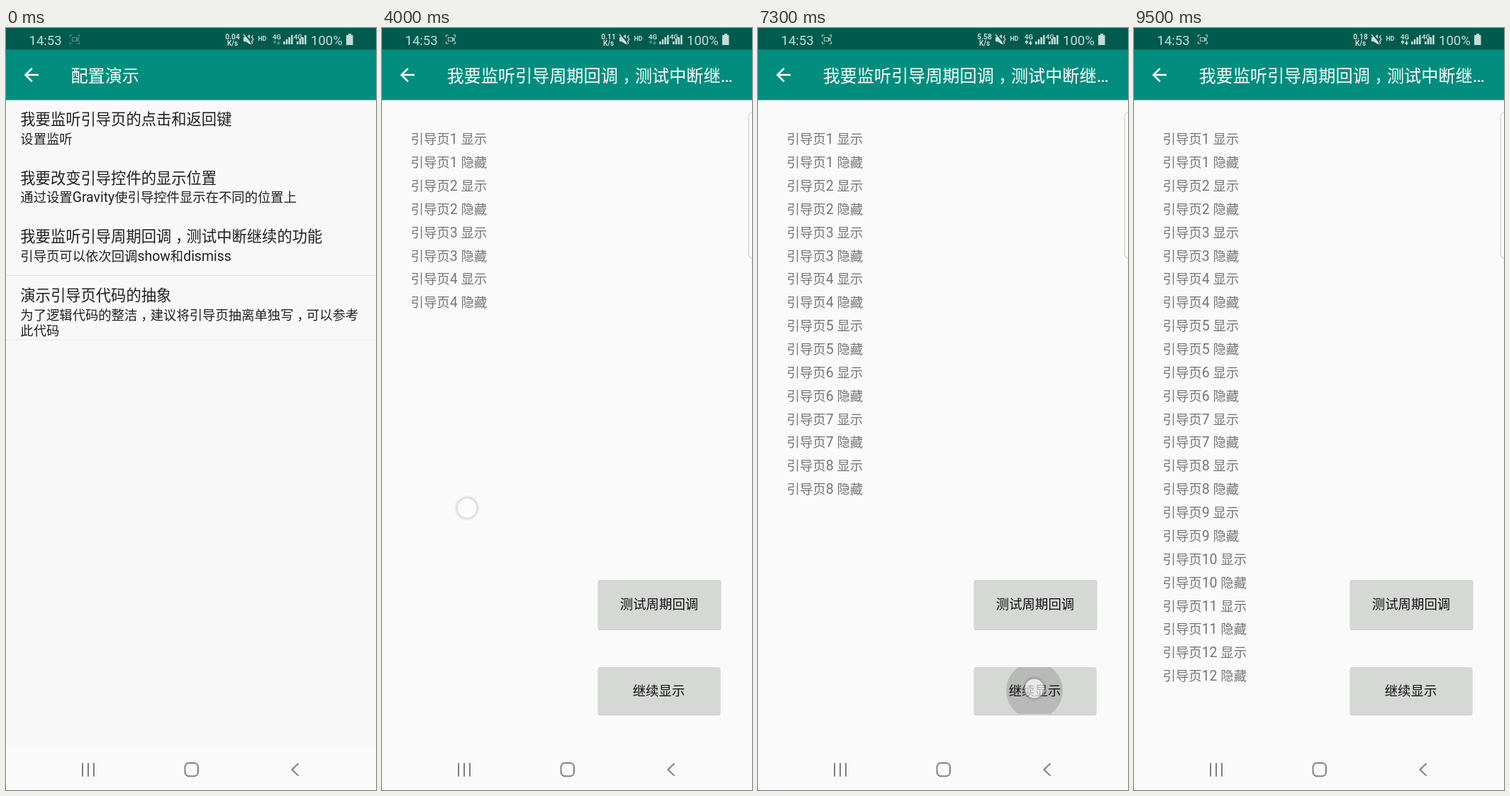
An HTML page that plays this animation: 522x1073 px, repeating every 9900 ms.

```html
<!DOCTYPE html>
<html lang="zh-CN">
<head>
<meta charset="utf-8">
<style>
html, body { margin: 0; width: 100%; height: 100%; overflow: hidden; background: #f9f9f9; }
svg { display: block; width: 522px; height: 1073px; }
text { font-family: Roboto, "Noto Sans CJK SC", "Noto Sans CJK", sans-serif; white-space: pre; }
</style>
</head>
<body>
<svg id="stage" viewBox="0 0 522 1073">
  <defs>
    <clipPath id="row"><rect y="266" width="522" height="82"/></clipPath>
    <clipPath id="test"><rect x="305" y="777" width="173" height="69" rx="2"/></clipPath>
    <clipPath id="next"><rect x="305" y="900" width="172" height="66" rx="2"/></clipPath>
    <filter id="soft" x="-50%" y="-50%" width="200%" height="200%"><feGaussianBlur stdDeviation="1"/></filter>
  </defs>
  <rect width="522" height="1073" fill="#f9f9f9"/>
  <g id="list">
    <rect y="30" width="522" height="71.500" fill="#008d7d"/>
    <path d="M0 348.5H522M0 439.5H522" stroke="#e6e6e6"/>
  </g>
  <g id="detail">
    <rect y="101" width="522" height="911" fill="#f9faf9"/>
    <rect y="30" width="522" height="71.500" fill="#008d7d"/>
    <rect x="304.5" y="778" width="174" height="70" rx="3" fill="#000" opacity=".16"/>
    <rect x="304.5" y="901" width="173" height="67" rx="3" fill="#000" opacity=".16"/>
    <rect x="305" y="777" width="173" height="69" rx="2" fill="#d6d8d6"/>
    <rect x="305" y="900" width="172" height="66" rx="2" fill="#d6d8d6"/>
  </g>
  <g id="ripples" fill="#000"></g>
  <g id="captions"></g>
  <g id="log"></g>
  <path transform="translate(20.6 50.8) scale(1.27)" fill="#fff"
    d="M20 11H7.83l5.59-5.59L12 4l-8 8 8 8 1.41-1.41L7.83 13H20v-2z"/>
  <rect id="shade" y="30" width="522" height="982" fill="#000600" opacity=".735"/>
  <g id="status">
    <rect id="bar" width="522" height="30.400"/>
    <g id="camera" fill="none" stroke="#c8dbd7" stroke-width="1.200">
      <path d="M90.500 13V10H93.500M100.500 10H103.500V13M103.500 19V22H100.500M93.500 22H90.500V19"/>
      <path id="lens" d="M93.500 13.500H99.500V18.500H93.500ZM99.500 15.500 102 14V18L99.500 16.500"/>
    </g>
    <g fill="#c8dbd7">
      <path d="M335 13H338L344 9V23L338 19H335Z"/>
      <path id="slash" d="M336.500 8 348 22" stroke-width="2"/>
      <path d="M335 9 346 23M348 10 346.500 13 349 16 346.500 19 348 22" fill="none" stroke="#c8dbd7" stroke-width="1.300"/>
      <path d="M481 10H483V8H487V10H489.500V24H480V10Z"/>
      <path id="bars"/>
    </g>
    <path id="arrows" d="M379 23V18M377 20.500 379 18 381 20.500M384.500 17.500V22.500M382.500 20.500 384.500 23 386.500 20.500"
      fill="none" stroke="#d5e5e2" stroke-width="1.300"/>
  </g>
  <g id="label">
    <rect id="plate" y="510.700" height="51.500" rx="2" fill="#d6d8d5"/>
  </g>
  <rect id="edge" x="517.500" y="118.500" width="20" height="206" rx="6" fill="#fff" fill-opacity=".78" stroke="#c4c6c4"/>
  <g id="dot">
    <circle r="15.500" fill="none" stroke="#999" stroke-opacity=".4" stroke-width="3" filter="url(#soft)"/>
    <circle r="13.500" fill="#fff" fill-opacity=".68"/>
    <circle r="14.300" fill="none" stroke="#8a8a8a" stroke-opacity=".6" stroke-width="1.200"/>
  </g>
  <rect y="1012" width="522" height="61" fill="#fafafa"/>
  <g fill="none" stroke="#7f8080" stroke-width="2">
    <path d="M108 1035V1054M116 1035V1054M124 1035V1054"/>
    <rect x="252.500" y="1035" width="18.500" height="18.500" rx="5.500"/>
    <path d="M412.500 1035.500 403.500 1044.300 412.500 1053"/>
  </g>
</svg>
<script>
const LOOP = 9900, STEP = 100;
const $ = id => document.getElementById(id);

function node(parent, tag, attrs) {
  const el = document.createElementNS("http://www.w3.org/2000/svg", tag);
  for (const k in attrs) el.setAttribute(k, attrs[k]);
  return parent.appendChild(el);
}

// beside Chinese, Latin is set a little larger and full-width commas sit mid-cell
const mix = str => !/[一-龥]/.test(str) ? str : str
  .replace(/[\x20-\x7e…]+/g, '<tspan font-size="1.06em">$&</tspan>')
  .replace(/，(.)/g, '<tspan dx=".27em">，</tspan><tspan dx="-.27em">$1</tspan>');

// cy is the optical middle of the line
function text(parent, str, x, cy, size, fill, more) {
  const el = node(parent, "text", { x, y: cy + size * 0.375, "font-size": size, fill, ...more });
  el.innerHTML = mix(str);
  return el;
}

const mid = { "text-anchor": "middle" };
const list = $("list"), detail = $("detail"), captions = $("captions"), status = $("status");

text(list, "配置演示", 91.4, 67, 24.15, "#fff");
[
  ["我要监听引导页的点击和返回键", "设置监听"],
  ["我要改变引导控件的显示位置", "通过设置Gravity使引导控件显示在不同的位置上"],
  ["我要监听引导周期回调，测试中断继续的功能", "引导页可以依次回调show和dismiss"],
  ["演示引导页代码的抽象", "为了逻辑代码的整洁，建议将引导页抽离单独写，可以参考", "此代码"]
].forEach(([head, ...subs], i) => {
  const y = 128 + i * 82.6;
  text(list, head, 20.3, y, 21.3, "#1f1f1f");
  subs.forEach((s, k) => text(list, s, 20.3, y + 28 + k * 22.7, 18.35, "#1f1f1f"));
});

text(detail, "我要监听引导周期回调，测试中断继…", 91.4, 67, 24.15, "#fff");
text(captions, "测试周期回调", 391, 811.5, 18.4, "#111", mid);
text(captions, "继续显示", 390.5, 933, 18.4, "#111", mid);

const ink = "#c8dbd7", bold = { ...mid, "font-weight": 700 };
text(status, "14:53", 32.5, 17, 18.5, ink);
text(status, "100%", 430, 17, 18.5, ink);
const speed = text(status, "", 319.5, 12, 10.3, ink, bold);
text(status, "K/s", 319.5, 21, 10, ink, bold);
text(status, "HD", 361.5, 15, 9, ink, bold);
text(status, "4G", 382, 12, 9.5, ink, bold);
text(status, "4G", 412, 12, 9.5, ink, bold);
$("bars").setAttribute("d", [391, 410].map(x => [0, 1, 2, 3].map(i =>
  `M${x + i * 3.7} 23v${-4 - i * 3}h2.600V23Z`).join("")).join(""));

const label = text($("label"), "", 260.8, 538, 28.7, "#fff", mid);

// show and hide time of each guide page
const pages = [
  [1900, 2500], [2500, 3000], [3000, 3500], [3500, 3900],
  [4600, 5500], [5500, 5800], [5800, 6200], [6200, 6600],
  [7500, 8000], [8000, 8300], [8300, 8600], [8600, 9000]
];
const lines = pages.flatMap((p, i) => ["显示", "隐藏"].map((word, k) => {
  const el = text($("log"), `引导页${i + 1} ${word}`, 40.6, 156.3 + (2 * i + k) * 32.87, 18.35, "#757575");
  return { el, from: p[k] };
}));

// touch: start, x, y, opacity per step
const tap = [1, 0.36], leave = [1, 0.8, 0.5];
const touches = [
  [100, 240, 310, tap],
  [2400, 112, 735, tap], [2900, 112, 745, tap], [3400, 114, 703, tap], [3800, 120, 676, leave],
  [4300, 390, 930, tap],
  [5400, 110, 694, tap], [5700, 109, 692, tap], [6100, 108, 690, tap], [6500, 107, 688, leave],
  [7300, 390, 930, tap],
  [7900, 110, 704, tap], [8200, 110, 702, tap], [8500, 111, 700, tap], [8900, 111, 698, leave]
];

// ripple: start, end, clip, x, y, first radius, growth per step, opacity
const ripples = [
  [100, 1100, "row", 240, 307, 70, 130, 0.1],
  [1700, 2000, "test", 395, 811, 80, 35, 0.14],
  [4300, 4700, "next", 390, 933, 40, 40, 0.14],
  [7300, 7600, "next", 390, 933, 40, 40, 0.14]
].map(([from, to, clip, cx, cy, r, grow, opacity]) => {
  const g = node($("ripples"), "g", { "clip-path": `url(#${clip})` });
  return { from, to, r, grow, opacity, clip, el: node(g, "circle", { cx, cy }) };
});

const speeds = [[0, "0.04", 0.4], [1400, "5.60", 1], [3400, "0.11", 0.4], [5400, "5.58", 1], [9500, "0.18", 1]];
const enter = [0.2, 0.45, 0.7, 0.9, 1];

const within = (t, a, b) => t >= a && t < b;
const show = (el, on) => el.setAttribute("visibility", on ? "visible" : "hidden");
const fade = (el, v) => el.setAttribute("opacity", v);

function draw(now) {
  const t = Math.floor((now % LOOP) / STEP) * STEP;

  const seen = t < 700 ? 0 : enter[Math.min(4, (t - 700) / STEP)];
  [detail, captions, $("edge")].forEach(el => fade(el, seen));

  for (const { from, to, r, grow, opacity, clip, el } of ripples) {
    show(el, within(t, from, to));
    el.setAttribute("r", Math.max(0, r + grow * (t - from) / STEP));
    fade(el, clip === "row" ? opacity * (1 - seen) : opacity);
  }

  for (const { el, from } of lines) show(el, t >= from);

  const page = pages.findIndex(([a, b]) => within(t, a, b)) + 1;
  const back = page ? "#006152" : "#005b4f";
  show($("shade"), page);
  show($("label"), page);
  $("bar").setAttribute("fill", back);
  $("slash").setAttribute("stroke", back);
  if (page) {
    const w = page > 9 ? 143.4 : 126.2;
    label.innerHTML = mix("引导页" + page);
    $("plate").setAttribute("x", 260.8 - w / 2);
    $("plate").setAttribute("width", w);
  }

  const [, rate, glow] = speeds.findLast(s => t >= s[0]);
  speed.textContent = rate;
  fade($("arrows"), glow);
  fade($("camera"), t < 100 ? 0.4 : 0.85);
  show($("lens"), !within(t, 2700, 2900));

  const touch = touches.find(([a, , , steps]) => within(t, a, a + steps.length * STEP));
  show($("dot"), touch);
  if (touch) {
    const [from, x, y, steps] = touch;
    $("dot").setAttribute("transform", `translate(${x} ${y})`);
    fade($("dot"), steps[(t - from) / STEP]);
  }
}

const start = performance.now();
function tick() {
  draw(performance.now() - start);
  requestAnimationFrame(tick);
}
tick();
</script>
</body>
</html>
```
